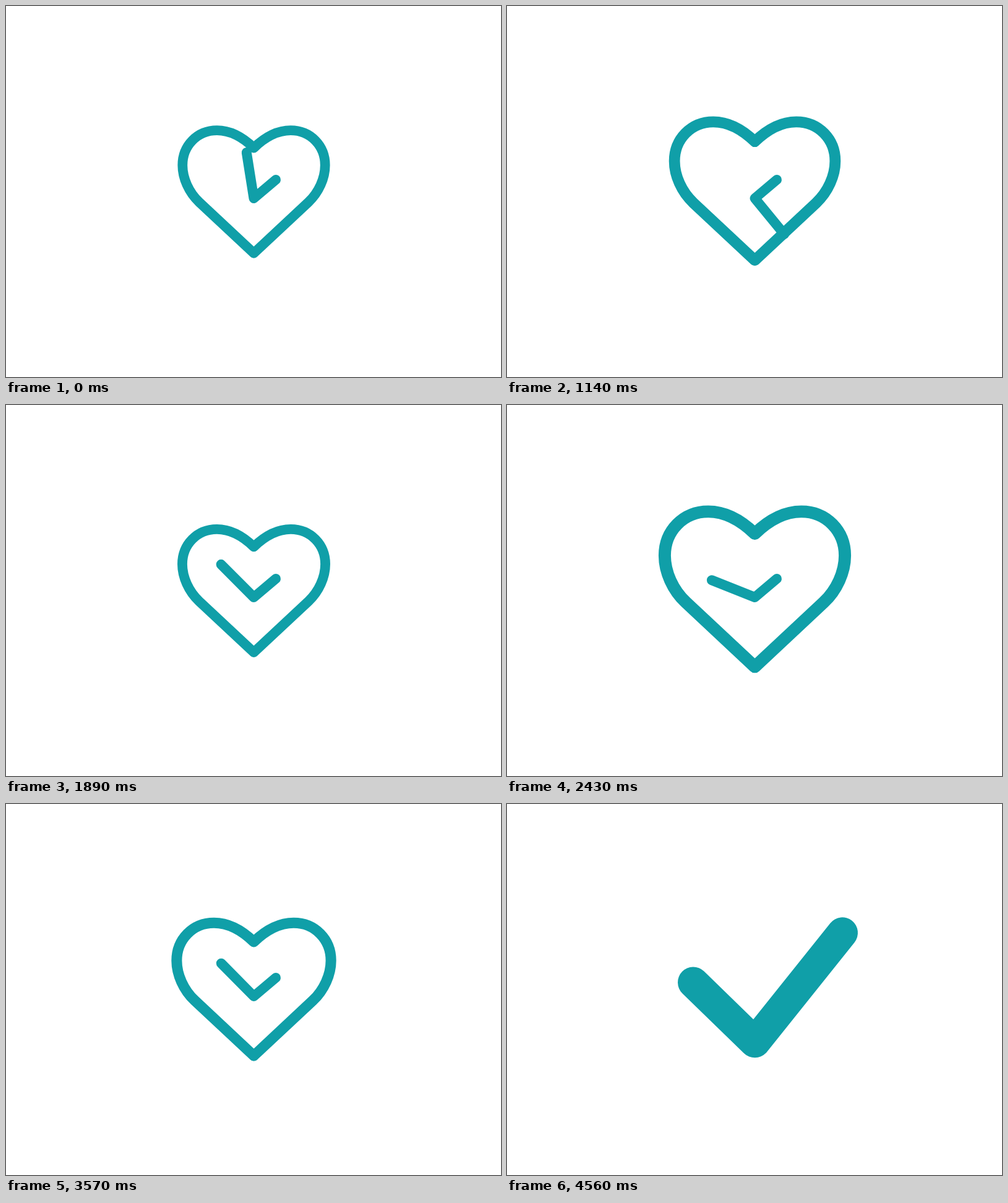
These frames come from a looping animation (800x600 px, 5.43 s). An HTML page with a canvas:

```html
<!DOCTYPE html>
<html lang="en">
<head>
<meta charset="utf-8">
<title>Heart clock check</title>
<style>
  html, body { margin: 0; width: 100%; height: 100%; overflow: hidden; background: #fff; }
  canvas { display: block; }
</style>
</head>
<body>
<canvas id="stage" width="800" height="600"></canvas>
<script>
const ctx = document.getElementById('stage').getContext('2d');
const LOOP = 5430, STEP = 30;
const TEAL = '#109fa8';
const CENTER = { x: 400.5, y: 310.5 };

// All times below are counted in steps of 30 ms.
const BEAT = 31, LAST_PEAK = 3.5 * BEAT;
const COLLAPSE = { from: 112.5, length: 25 };
const MORPH = { from: 123, length: 20 };
const TURN = { period: 2 * BEAT, windUp: BEAT / 2, length: 42 };
const ANGLE = { first: -9, rest: -44.5, back: -76 };

const clamp = v => Math.min(1, Math.max(0, v));
const mix = (a, b, k) => a + (b - a) * k;
const smooth = v => { v = clamp(v); return v * v * (3 - 2 * v); };

function heartScale(n) {
  if (n < LAST_PEAK) return 1 + 0.15 * (1 - Math.cos(2 * Math.PI * n / BEAT));
  return 1.3 * (1 - smooth((n - COLLAPSE.from) / COLLAPSE.length));
}

// Degrees clockwise from twelve o'clock: two turns, each with a wind-up.
function handAngle(n) {
  if (n >= 2 * TURN.period) return ANGLE.rest;
  const t = n % TURN.period;
  const start = n < TURN.period ? ANGLE.first : ANGLE.rest;
  if (t < TURN.windUp) return mix(start, ANGLE.back, smooth(t / TURN.windUp));
  return mix(ANGLE.back, ANGLE.rest + 360, smooth((t - TURN.windUp) / TURN.length));
}

function halfHeart(path, side) {
  const p = (x, y) => [x * side, y];
  const curve = (a, b, c) => path.bezierCurveTo(...a, ...b, ...c);
  path.moveTo(0, -81);
  curve(p(-16.5, -97), p(-37, -109.3), p(-59.5, -109.3));
  curve(p(-91.5, -109.3), p(-115.2, -84.5), p(-115.2, -53));
  curve(p(-115.2, -32), p(-105, -9), p(-88, 7));
  path.lineTo(0, 89.3);
}

const heart = new Path2D();
halfHeart(heart, 1);
halfHeart(heart, -1);

function drawHeart(scale) {
  if (scale < 0.005) return;
  ctx.save();
  ctx.translate(CENTER.x, CENTER.y);
  ctx.scale(scale, scale);
  ctx.lineWidth = 15.8;
  ctx.stroke(heart);
  ctx.restore();
}

function drawHands(n) {
  const k = smooth((n - MORPH.from) / MORPH.length);
  const angle = handAngle(n) * Math.PI / 180;
  const tipX = CENTER.x + 75 * Math.sin(angle);
  const tipY = CENTER.y + 0.5 - 75 * Math.cos(angle);
  ctx.lineWidth = mix(16, 50, k);
  ctx.beginPath();
  ctx.moveTo(mix(tipX, 301, k), mix(tipY, 288.5, k));
  ctx.lineTo(CENTER.x, mix(311, 385.3, k));
  ctx.lineTo(mix(436, 542, k), mix(281, 208.3, k));
  ctx.stroke();
}

function render() {
  const n = Math.floor((performance.now() % LOOP) / STEP);
  ctx.fillStyle = '#fff';
  ctx.fillRect(0, 0, 800, 600);
  ctx.strokeStyle = TEAL;
  ctx.lineCap = ctx.lineJoin = 'round';
  drawHeart(heartScale(n));
  drawHands(n);
  requestAnimationFrame(render);
}
render();
</script>
</body>
</html>
```
